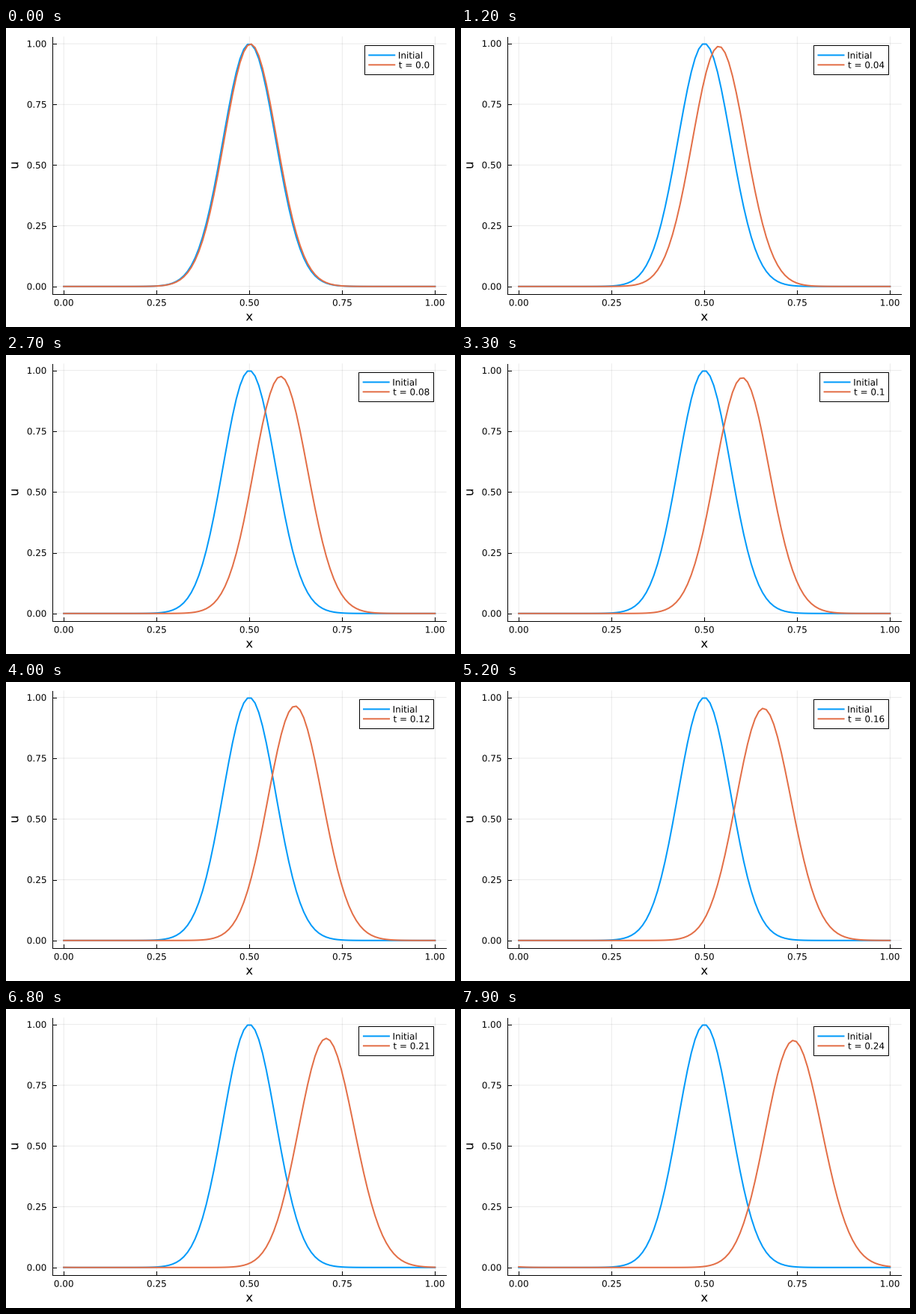
A matplotlib script for the animation above (8 s loop, 600 px wide and 400 px high).

```python
import numpy as np
import matplotlib.pyplot as plt
from matplotlib.animation import FuncAnimation
from matplotlib.patches import PathPatch, Rectangle
from matplotlib.textpath import TextPath
from matplotlib.transforms import Affine2D

W, H = 600, 400
DPI = 100
PX = 72 / DPI                      # one pixel in points
LEFT, RIGHT, TOP, BOTTOM = 62.3, 588.2, 11.8, 355.5
BLUE, ORANGE = "#009afa", "#e36f47"
FRAMES, INTERVAL = 80, 100
TICKS = np.linspace(0, 1, 5)

# Advection of a Gaussian: implicit Euler, central differences, periodic
N, CFL = 100, 0.3
x = np.linspace(0, 1, N)
dt = CFL * (x[1] - x[0])
eye = np.eye(N)
step = np.linalg.inv(eye + CFL / 2 * (np.roll(eye, 1, axis=1) - np.roll(eye, -1, axis=1)))
states = [np.exp(-100 * (x - 0.5) ** 2)]
for _ in range(FRAMES):
    states.append(step @ states[-1])

fig = plt.figure(figsize=(W / DPI, H / DPI), dpi=DPI, facecolor="white")
ax = fig.add_axes([0, 0, 1, 1])


def glyphs(s, size, angle=0):
    path = TextPath((0, 0), s, size=size, prop={"family": "DejaVu Sans"})
    return path.transformed(Affine2D().scale(1, -1).rotate_deg(-angle))


def text(px, py, s, size=12, anchor=0.5, angle=0):
    """Place text by its ink box: anchor across, centred down."""
    path = glyphs(s, size, angle)
    box = path.get_extents()
    shift = Affine2D().translate(px - box.x0 - anchor * box.width,
                                 py - (box.y0 + box.y1) / 2)
    ax.add_patch(PathPatch(path.transformed(shift), fc="black", lw=0, zorder=6))


def line(xs, ys, color="black", width=1.0, z=3, **kw):
    ax.plot(xs, ys, color=color, lw=width * PX, zorder=z, **kw)


def to_x(v):
    return LEFT + (RIGHT - LEFT) * (v + 0.03) / 1.06


def to_y(v, top):
    return BOTTOM - (BOTTOM - TOP) * (v / top + 0.03) / 1.06


def draw_axes(top):
    for v in TICKS:
        px, py = to_x(v), to_y(v, top)
        grid = dict(color="black", width=0.8, z=1, alpha=0.1, snap=False)
        line([px, px], [TOP, BOTTOM], **grid)
        line([LEFT, RIGHT], [py, py], **grid)
        line([px, px], [BOTTOM, BOTTOM - 5], z=2)
        line([LEFT, LEFT + 5], [py, py], z=2)
        text(px, 367.3, f"{v:.2f}")
        text(53.5, py, f"{v:.2f}", anchor=1)
    line([LEFT, LEFT], [TOP, BOTTOM], z=2)
    line([LEFT, RIGHT], [BOTTOM, BOTTOM], z=2)
    text(325.2, 386.9, "x", size=16.5)
    text(11.8, 183.7, "u", size=16.5, angle=90)


def draw_legend(label):
    right, top, row = 571, 23.4, 12.95
    tx = right - 5.6 - glyphs(label, 12).get_extents().width
    left = tx - 46.3
    ax.add_patch(Rectangle((left, top), right - left, 3 * row,
                           fc="white", ec="black", lw=PX, zorder=5))
    for k, (name, color) in enumerate([("Initial", BLUE), (label, ORANGE)], 1):
        y = top + k * row
        line([tx - 40.8, tx - 4.8], [y, y], color, 2, z=6,
             solid_capstyle="butt", snap=False)
        text(tx, y, name, anchor=0)


def draw(i):
    ax.clear()
    ax.set(xlim=(0, W), ylim=(H, 0))
    ax.axis("off")
    n = i + 1
    first, u = states[0], states[n]
    top = max(first.max(), u.max())
    draw_axes(top)
    line(to_x(x), to_y(first, top), BLUE, 2, snap=False)
    line(to_x(x), to_y(u, top), ORANGE, 2, z=4, snap=False)
    draw_legend(f"t = {round(n * dt, 2)}")
    return []


anim = FuncAnimation(fig, draw, frames=FRAMES, interval=INTERVAL,
                     init_func=lambda: [], repeat=True, repeat_delay=0)
plt.show()
```
